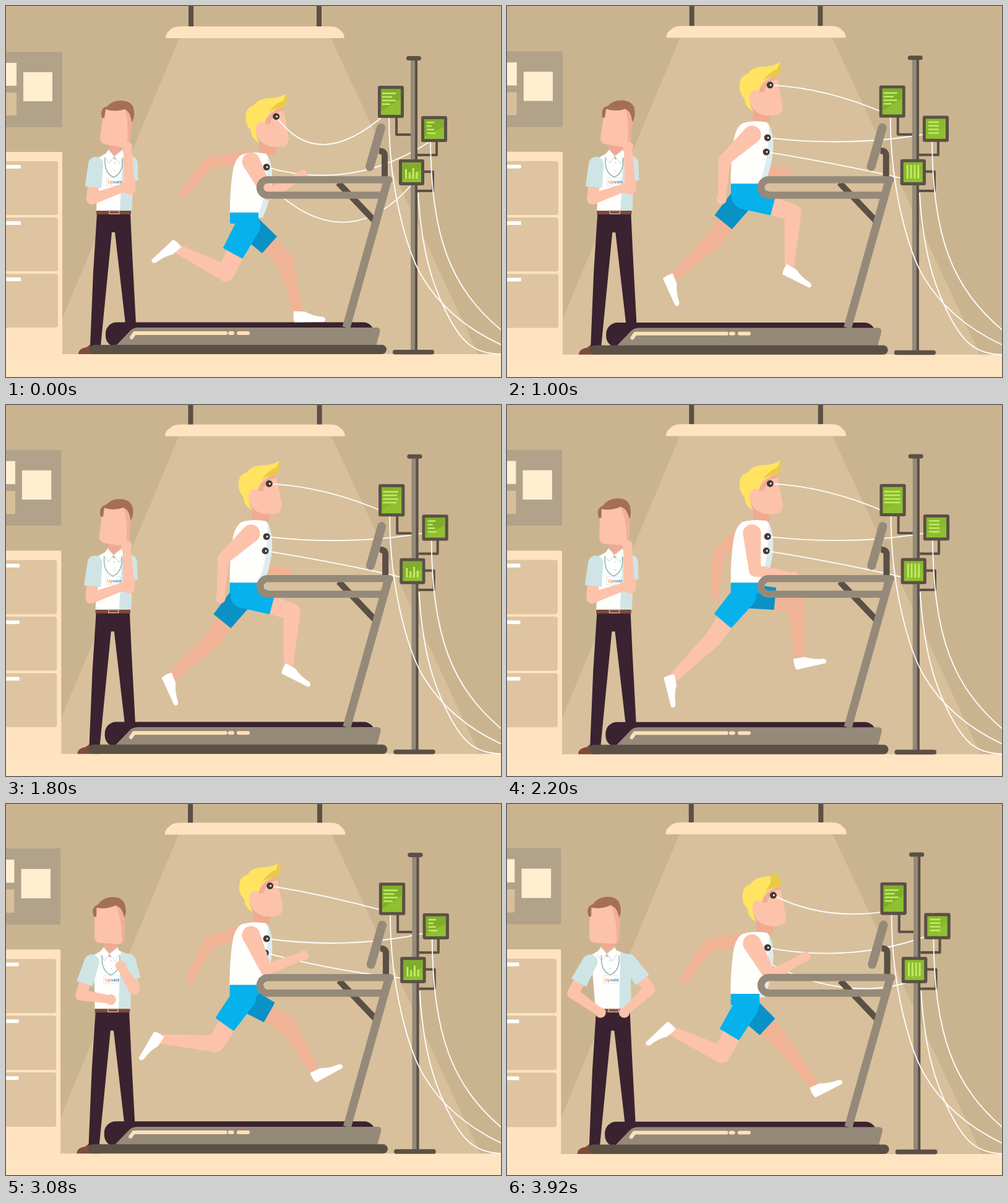
These frames come from a looping animation (800 px wide and 600 px high, 3.96 s). An HTML page with a canvas:

```html
<!DOCTYPE html>
<html lang="en">
<head>
<meta charset="utf-8">
<title>Treadmill test</title>
<style>
html, body { margin: 0; width: 100%; height: 100%; overflow: hidden; background: #cab490; }
canvas { display: block; }
</style>
</head>
<body>
<canvas id="stage" width="800" height="600"></canvas>
<script>
const c = document.getElementById('stage').getContext('2d');
const LOOP = 3960, STRIDE = 800, TAU = Math.PI * 2;
const DARK = '#5b5045', GRAY = '#958a79', CREAM = '#ffe3c0', PLUM = '#3a2230';
const SKIN = '#fdc2aa', SKIN_FAR = '#f0b395', WHITE = '#fefefd', PALE = '#cfe5e5';

// Drawing helpers
const rect = (x, y, w, h, color, r = 0) => {
  c.fillStyle = color;
  c.beginPath();
  c.roundRect(x, y, w, h, r);
  c.fill();
};
const disc = (x, y, r, color) => {
  c.fillStyle = color;
  c.beginPath();
  c.arc(x, y, r, 0, TAU);
  c.fill();
};
const shape = (d, color) => { c.fillStyle = color; c.fill(new Path2D(d)); };
const line = (d, color, width, cap = 'round') => {
  c.strokeStyle = color;
  c.lineWidth = width;
  c.lineCap = cap;
  c.lineJoin = 'round';
  c.stroke(new Path2D(d));
};
const poly = (pts, color) => shape('M' + pts.join('L') + 'Z', color);
const at = (x, y, draw, angle = 0) => {
  c.save();
  c.translate(x, y);
  c.rotate(angle);
  draw();
  c.restore();
};

// Tapered segment from a to b; the end at b may be square
function taper(a, b, wa, wb, color, square) {
  const len = Math.hypot(b[0] - a[0], b[1] - a[1]) || 1;
  const nx = (a[1] - b[1]) / len / 2, ny = (b[0] - a[0]) / len / 2;
  poly([[a[0] + nx * wa, a[1] + ny * wa], [b[0] + nx * wb, b[1] + ny * wb],
        [b[0] - nx * wb, b[1] - ny * wb], [a[0] - nx * wa, a[1] - ny * wa]], color);
  disc(a[0], a[1], wa / 2, color);
  if (!square) disc(b[0], b[1], wb / 2, color);
}

// Motion helpers
const clamp = v => Math.max(0, Math.min(1, v));
const mix = (a, b, k) => a + (b - a) * k;
const mixPoint = (a, b, k) => [mix(a[0], b[0], k), mix(a[1], b[1], k)];
const ease = k => k * k * (3 - 2 * k);
const reach = ([x, y], deg, len) =>
  [x + Math.sin(deg * TAU / 360) * len, y + Math.cos(deg * TAU / 360) * len];

// Eased one-way keys: [time, ...values]
function track(t, keys) {
  let i = 0;
  while (i < keys.length - 2 && t >= keys[i + 1][0]) i++;
  const [a, b] = [keys[i], keys[i + 1]];
  const k = ease(clamp((t - a[0]) / (b[0] - a[0])));
  return a.slice(1).map((v, j) => mix(v, b[j + 1], k));
}

// Smooth periodic keys: [phase, ...values]
function cycle(q, keys) {
  q -= Math.floor(q);
  const n = keys.length;
  const key = i => {
    const turn = Math.floor(i / n), k = keys[i - turn * n];
    return [k[0] + turn, ...k.slice(1)];
  };
  let i = -1;
  while (key(i + 1)[0] <= q) i++;
  const [p, a, b, d] = [key(i - 1), key(i), key(i + 1), key(i + 2)];
  const h = b[0] - a[0], s = (q - a[0]) / h, s2 = s * s, s3 = s2 * s;
  return a.slice(1).map((v, j) => {
    j++;
    const ma = (b[j] - p[j]) / (b[0] - p[0]) * h, mb = (d[j] - a[j]) / (d[0] - a[0]) * h;
    return v * (2 * s3 - 3 * s2 + 1) + ma * (s3 - 2 * s2 + s) + b[j] * (3 * s2 - 2 * s3) + mb * (s3 - s2);
  });
}

// Angles in degrees from straight down, forward positive: thigh, shin, foot
const NEAR_LEG = [[0, -19, -117, -47], [.12, 28, -80, 0], [.25, 67, -4, 63], [.45, 33, 34, 113],
  [.5, 42, 16, 91], [.62, 5, -18, 85], [.75, -29, -45, 15], [.9, -21, -115, -46]];
const FAR_LEG = [[.12, 28, -80, 0], [.25, 75, 4, 102], [.4, 44, 36, 117], [.5, 45, 15, 91],
  [.62, 5, -18, 85], [.75, -28, -47, 25], [.95, -30, -120, -48]];
// Upper arm, forearm
const ARM = [[0, 28, 120], [.25, -47, -4], [.42, -84, -38], [.5, -82, -39], [.75, 4, 81], [.9, 29, 119]];

function room() {
  rect(-20, -20, 840, 640, '#cab490');
  shape('M280 52H525L763 563H67Z', '#d8c09c');
  rect(295, -10, 8, 46, DARK);
  rect(502, -10, 8, 46, DARK);
  shape('M258 52Q258 44 264 40Q270 33 282 33H524Q536 33 541 40Q547 44 547 52Z', CREAM);
  rect(-20, 74, 111, 122, '#b2a28a');
  rect(-20, 92, 37, 37, '#ffeecf');
  rect(28, 107, 47, 47, '#ffeecf');
  rect(-20, 140, 37, 37, '#d9be9a');
  rect(-20, 563, 840, 60, '#ffe4c2');
  rect(-20, 236, 111, 328, CREAM, 3);
  [251, 342, 433].forEach(y => {
    rect(-20, y, 104, 87, '#dec4a0', 4);
    rect(-20, y + 6, 44, 6, WHITE, 1);
  });
}

function monitor(x, y, w, h, level, content) {
  rect(x, y, w, h, DARK, 3);
  rect(x + 5, y + 5, w - 10, h - 10, '#8fc031');
  c.globalAlpha = 1 - .6 * level;
  poly([[x + 5, y + 5], [x + w - 5, y + 5], [x + w - 5, y + h * .4], [x + 5, y + h * .8]], '#80ae2c');
  c.globalAlpha = 1;
  content();
}

function textLines(x, y, step, lengths, full, level) {
  lengths.forEach((n, i) => rect(x, y + i * step, mix(n, full, level), 2.6, '#c2ea62'));
}

function stand(t) {
  const level = clamp(.5 - 4 * Math.cos(TAU * t / 1600));
  const topLevel = clamp((t - 1700) / 150) * clamp((3100 - t) / 150);
  line('M631 180V208H655M696 218V241H665M675 268H690V299H665', DARK, 4, 'butt');
  rect(654, 85, 11, 473, GRAY);
  rect(661, 85, 4, 473, DARK);
  rect(647, 81, 24, 7, DARK, 3.5);
  rect(625, 556, 67, 7.5, DARK, 3.5);
  line('M619 181C619 300 650 400 672 437Q715 510 805 550', WHITE, 1.8);
  line('M686 220C688 370 715 455 805 528', WHITE, 1.8);
  line('M666 303C672 400 690 450 708 488C735 545 755 563 805 563', WHITE, 1.8);
  monitor(601, 129, 42, 52, topLevel, () => textLines(608, 140, 5.8, [22, 16, 22, 13], 26, topLevel));
  monitor(671, 178, 42, 42, level, () => textLines(680, 187, 5.8, [12, 8, 12, 14], 17, level));
  monitor(635, 248, 41, 42, level, () => [15, 10, 17, 11].forEach((n, i) => {
    const height = mix(n, 22, level);
    rect(645 + i * 5.8, 279 - height, 3, height, '#c2ea62');
  }));
}

function scientist(t) {
  const [tilt, shift] = track(t, [[1700, 0, 0], [2150, -.12, 0], [2850, -.12, 0], [3350, -.12, -13], [3800, -.12, -15]]);
  const [lex, ley, lhx, lhy] = track(t, [[2850, 139, 312, 190, 294], [3300, 110, 306, 154, 337]]);
  const [rex, rey, rhx, rhy] = track(t, [[2850, 200, 296, 196, 228], [3400, 223, 303, 173, 318], [3750, 232, 300, 192, 337]]);
  const open = ease(clamp((t - 2850) / 450)), lean = -11 * open;

  shape('M117 563Q117 554 130 552L138 546L152 552V563Z', '#7f4b3a');
  shape('M147 336H201L204 400L210 514H193L176 366H171L153 550H136L141 430Z', PLUM);
  poly([[150 + lean, 245], [166 + lean, 236], [186 + lean, 236], [206 + lean * .4, 246], [203, 331], [146, 331]], WHITE);
  poly([[189 + lean * .3, 240], [206 + lean * .4, 246], [203, 331], [184, 331]], PALE);
  rect(146, 331, 56, 6, '#7e4a3c');
  c.strokeStyle = '#d0ad96';
  c.lineWidth = 1.5;
  c.strokeRect(167, 331, 16, 5);

  at(lean, 0, () => {
    shape('M167 212H189V236L176 249L166 238Z', '#efa994');
    shape('M166 232L175 243L167 254L158 243ZM188 232L175 243L184 255L192 243Z', WHITE);
    line('M166 233L175 243L167 254L159 244M188 233L175 243L184 255L191 244', '#c9dfe0', 1);
  });
  [254, 267].forEach(y => disc(176 + lean * .6, y, 1, '#b9cfd0'));
  at(lean * .4, 0, () => {
    line('M160 246Q158 270 174 277Q190 270 188 246', '#7ba3a3', 1.2);
    rect(163, 278, 23, 13, '#fff', 1);
    c.strokeStyle = '#d7dfdf';
    c.lineWidth = .7;
    c.strokeRect(163, 278, 23, 13);
    c.font = '600 7px "Open Sans", sans-serif';
    c.fillStyle = '#f08030';
    c.fillText('Up', 164.5, 287);
    c.fillStyle = '#2d83b5';
    c.fillText('vale', 164.5 + c.measureText('Up').width, 287);
  });

  // The head tilts about the chin
  at(176 + shift, 222, () => at(-176, -222, () => {
    shape('M157 178L152 212Q151 222 162 224L190 229Q199 229 200 218L204 182L198 164H160Z', SKIN);
    shape('M192 166L204 182L200 218Q199 226 194 229Q200 194 192 166Z', '#f1ae98');
    shape('M155 181Q151 165 164 162Q172 152 188 153Q206 155 207 170Q208 182 203 188Q202 172 192 167Q176 172 161 167L159 181Z', '#a56f55');
  }), tilt);

  const arm = (shoulder, elbow, hand) => {
    taper(shoulder, elbow, 20, 18, SKIN);
    taper(shoulder, mixPoint(shoulder, elbow, .66), 24, 27, PALE, true);
    taper(elbow, hand, 18, 13, SKIN);
    disc(...hand, 8.5, SKIN);
  };
  arm([201 + lean * .2, 255], [rex, rey], [rhx, rhy]);
  arm([145 + lean * .7, 256], [lex, ley], [lhx, lhy]);
}

function leg(hip, q, keys, skin, cloth) {
  const [thigh, shin, foot] = cycle(q, keys);
  const knee = reach(hip, thigh, 92), ankle = reach(knee, shin, 96);
  const root = [hip[0] + 6, hip[1] + 10];
  taper(root, knee, 34, 27, skin);
  taper(knee, ankle, 27, 14, skin);
  at(...ankle, () => shape('M-9 -10L9 -9Q20 -2 38 0Q45 3 40 8H-8Q-11 0 -9 -10Z', '#fff'), (90 - foot) * TAU / 360);
  taper(root, reach(hip, thigh, 58), 40, 36, cloth, true);
}

function runnerArm(shoulder, q, skin, width) {
  const [upper, fore] = cycle(q, ARM);
  const elbow = reach(shoulder, upper, 60), hand = reach(elbow, fore, 64);
  taper(shoulder, elbow, width, 19, skin);
  taper(elbow, hand, 19, 12, skin);
  disc(...hand, 8, skin);
}

function head(flop) {
  const tip = 441 - 18 * flop;
  shape('M398 168H425V187Q412 194 398 188Z', '#efaa90');
  shape('M393 138L408 118L436 112L445 160Q446 177 432 177H418Q400 174 394 158Q389 148 393 138Z', SKIN);
  shape('M407 140Q408 124 436 112L437 119Q420 120 415 140Z', '#f1ae94');
  shape(`M397 170Q384 163 384 150Q374 140 376 126Q377 113 389 110Q396 98 418 98Q432 97 ${tip} 91Q445 108 434 114Q410 118 407 138Q398 134 393 142Q390 152 397 170Z`, '#ffe361');
  shape(`M${tip} 91Q445 108 434 114Q420 116 413 121Q424 106 ${tip - 4} 102Z`, '#e9c945');
}

function sensor(x, y) {
  disc(x, y, 5.5, '#453a35');
  disc(x + 1, y, 1.5, '#fff');
}

function runner(t) {
  const q = t / STRIDE, swing = TAU * (2 * q - .075);
  const drop = 28 * (1 + Math.cos(swing)) - 2.5;
  const flop = Math.max(0, -Math.sin(swing)) ** 6;
  const hip = [377 + .16 * drop, 298 + .93 * drop], headX = .23 * drop;

  runnerArm([386, 201 + .87 * drop], q + .5, SKIN_FAR, 22);
  leg(hip, q + .5, FAR_LEG, SKIN_FAR, '#0a91c6');
  at(headX, drop, () => head(flop));
  at(0, drop, () => {
    shape('M380 190Q398 184 420 188Q430 200 430 228Q428 262 415 291H362Q361 255 366 220Q369 198 380 190Z', WHITE);
    shape('M423 191Q430 204 430 228Q428 262 415 291H406Q424 250 423 191Z', '#dcecee');
  });
  leg(hip, q, NEAR_LEG, SKIN, '#06b1ec');
  rect(362, 287 + .93 * drop, 46, 18, '#06b1ec', 1);

  const eye = [425 + headX, 128 + drop];
  const chest = 213 + .94 * drop, belly = 236 + .94 * drop;
  line(`M${eye}Q${518 - .3 * drop} ${132 + 2.75 * drop} 613 175`, WHITE, 1.8);
  line(`M421 ${chest}Q560 ${229 + 1.43 * drop} 689 ${205 + .23 * drop}`, WHITE, 1.8);
  line(`M419 ${belly}Q548 ${256 + 3.15 * drop} 660 284`, WHITE, 1.8);
  sensor(...eye);
  sensor(421, chest);
  sensor(419, belly);
  runnerArm([396, 208 + .86 * drop], q, SKIN, 29);
}

function treadmillBase() {
  rect(161, 511.5, 434, 40, PLUM, 18);
  shape('M176 551L200 526Q205 520 214 520H600Q606 521 604 528L598 551Z', GRAY);
  line('M203 536L208 529H355M376 529H391', '#ffe0b9', 6);
  rect(359, 526, 10, 6, '#ffe0b9', 3);
  rect(135, 548, 480, 15, DARK, 7.5);
}

function treadmillFrame() {
  line('M537 286L598 350', DARK, 10, 'butt');
  line('M612 278V242Q612 235 603 234', DARK, 10, 'butt');
  line('M606 197L588 260', GRAY, 14);
  line('M617 281L550 520', GRAY, 13, 'butt');
  line('M619 281H423A12.5 12.5 0 0 0 423 306H610', GRAY, 11.5);
}

const start = performance.now();
function frame() {
  const t = (performance.now() - start) % LOOP, zoom = 1 + .012 * t / LOOP;
  c.setTransform(zoom, 0, 0, zoom, 400 * (1 - zoom), 315 * (1 - zoom));
  room();
  scientist(t);
  treadmillBase();
  runner(t);
  stand(t);
  treadmillFrame();
  requestAnimationFrame(frame);
}
frame();
</script>
</body>
</html>
```
